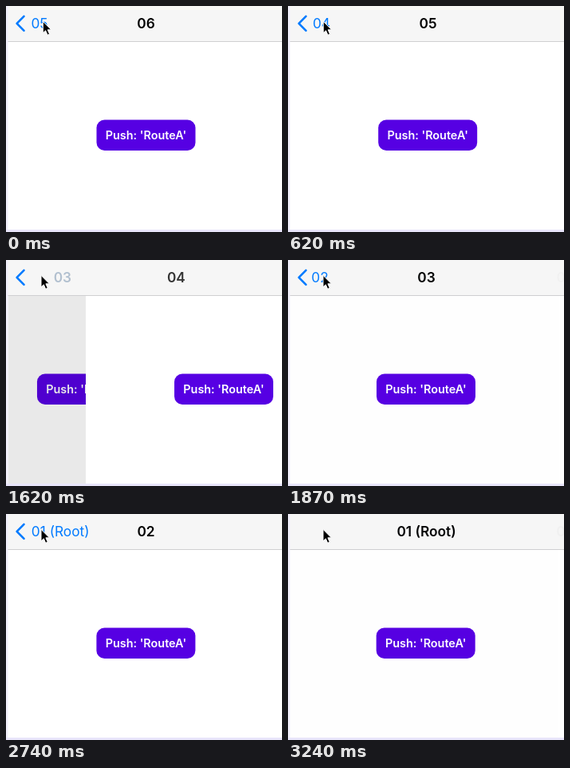
Animation, 346 px wide and 283 px high, one loop 3.36 s. Source, as an HTML page:

```html
<!DOCTYPE html>
<html lang="en">
<head>
<meta charset="utf-8">
<title>Stack navigation</title>
<style>
  html, body { margin: 0; width: 100%; height: 100%; overflow: hidden; background: #fff; }
  svg { display: block; width: 100%; height: 100%; }
  text { font-family: Inter, Roboto, sans-serif; font-size: 17.3px; text-anchor: middle; }
  .title { font-weight: 600; }
  .back { fill: #007aff; }
  .push { font-size: 14.4px; font-weight: 600; fill: #fff; }
</style>
</head>
<body>
<svg viewBox="0 0 346 283" preserveAspectRatio="none">
  <defs>
    <clipPath id="backClip"><rect x="14" y="0" width="332" height="44"/></clipPath>
    <g id="page">
      <rect x="2.5" y="44" width="346" height="236" fill="#fff"/>
      <rect x="113.5" y="142.5" width="124" height="38.5" rx="10" fill="#5600e3"/>
      <text class="push" x="175.5" y="167.3">Push: 'RouteA'</text>
    </g>
  </defs>
  <rect width="346" height="283" fill="#fff"/>
  <use id="under" href="#page"/>
  <rect id="dim" x="2.5" y="44" width="344" height="236"/>
  <use id="over" href="#page"/>

  <rect width="346" height="44" fill="#f6f6f6"/>
  <rect y="44" width="346" height="1" fill="#cfcfd1"/>
  <g clip-path="url(#backClip)"><text id="newBack" class="back" y="27.8"></text></g>
  <text id="oldBack" class="back" y="27.8"></text>
  <text id="newTitle" class="title" y="27.8"></text>
  <text id="oldTitle" class="title" y="27.8"></text>
  <path id="chevron" d="M22.5 12.8 13.6 21.8l8.9 9" fill="none" stroke="#007aff"
        stroke-width="2.6" stroke-linecap="round" stroke-linejoin="round"/>

  <rect width="2.5" height="283" fill="#f1effb"/>
  <rect y="280" width="346" height="3" fill="#e8e5fa"/>
  <path id="cursor" d="M0 0V14.6L3.3 11.5 5.7 17 8.3 15.9 5.9 10.5H10.4Z"
        fill="#000" stroke="#fff" stroke-width="1"/>
</svg>
<script>
const LOOP = 3360, STEP = 124.8;
const WIDTH = 346, MID = 175.5, BACK_LEFT = 31.7;
const POPS = [186, 906, 1565, 2236, 2945];
const OMEGA = Math.sqrt(1000 / 3) / 1000;

const el = {};
document.querySelectorAll('svg [id]').forEach(e => el[e.id] = e);

const name = n => n < 1 ? '' : n === 1 ? '01 (Root)' : '0' + n;
const backMid = n => BACK_LEFT + (n === 1 ? 36.5 : 10.3);

// Critically damped spring from 0 to 1
const spring = ms => 1 - (1 + OMEGA * ms) * Math.exp(-OMEGA * ms);

function label(e, n, x, alpha) {
  e.textContent = name(n);
  e.setAttribute('x', x);
  e.setAttribute('opacity', alpha);
}

const shift = (e, x, y = 0) => e.setAttribute('transform', `translate(${x} ${y})`);

function hold(t) {
  const tick = Math.floor(t / 10) * 10 + 10;
  return (Math.ceil(tick / STEP) - 1) * STEP;
}

function draw(t) {
  const pop = POPS.filter(s => s <= t).length;
  const p = pop ? spring(t - POPS[pop - 1]) : 1;
  const q = Math.min(1, 1.015 * p ** 1.22);
  const top = 6 - pop, left = 1 - q;

  shift(el.under, -0.3 * WIDTH * (1 - p));
  shift(el.over, WIDTH * p);
  el.dim.setAttribute('opacity', 0.12 * (1 - p));

  const travel = MID - backMid(top);
  const x = MID - travel * left;
  label(el.oldTitle, top + 1, MID + 175 * q, left);
  label(el.newTitle, top, x, q);
  el.newTitle.setAttribute('fill', `rgb(0 ${Math.round(45 * left)} ${Math.round(90 * left)})`);
  label(el.oldBack, top, x, left ** 10);
  label(el.newBack, top - 1, backMid(top - 1) - travel * left, q);
  el.chevron.setAttribute('opacity', top > 1 ? 1 : left ** 6);

  shift(el.cursor, 44 + 2.3 * Math.max(0, 1 - t / 700), 19.3);
}

function frame() {
  draw(hold(performance.now() % LOOP));
  requestAnimationFrame(frame);
}
frame();
</script>
</body>
</html>
```
